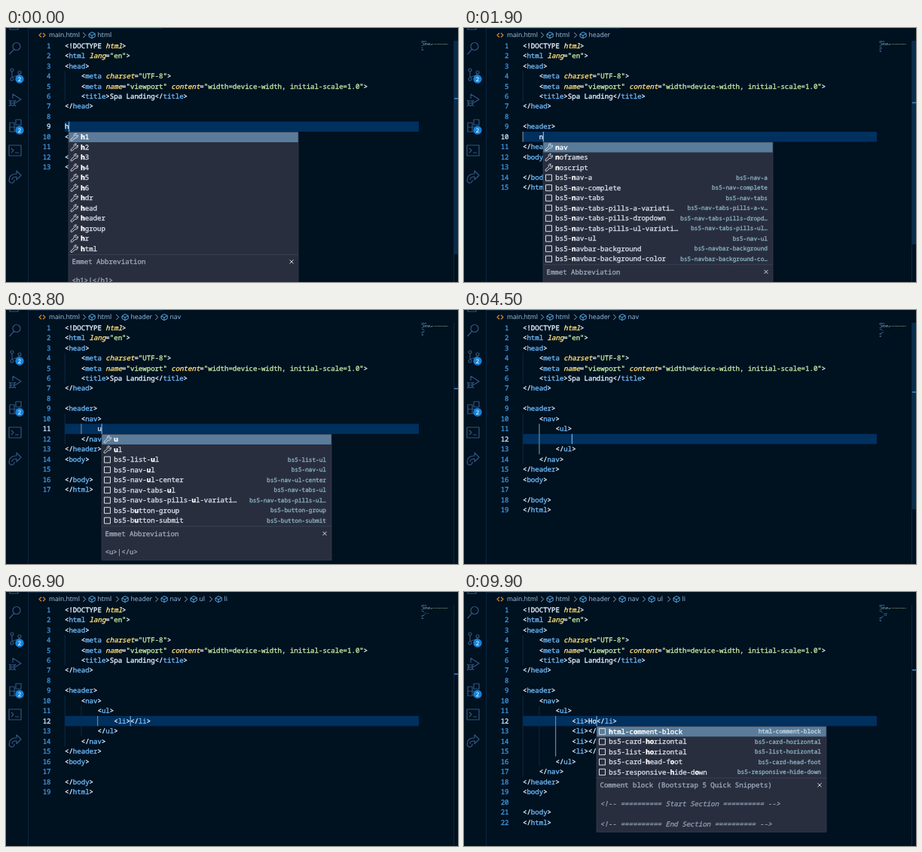
An HTML page with a canvas for the animation above (10000 ms loop, 600x338 px).

```html
<!DOCTYPE html>
<html lang="en">
<head>
<meta charset="UTF-8">
<title>Editor typing loop</title>
<style>
html, body { margin: 0; width: 100%; height: 100%; overflow: hidden; background: #001120; }
canvas { display: block; width: 600px; height: 338px; }
</style>
</head>
<body>
<canvas id="stage" width="600" height="338"></canvas>
<script>
const ctx = document.getElementById('stage').getContext('2d');
const LOOP = 10000, X0 = 78, Y0 = 23.5, CW = 5.435, LH = 13.47, VIEW = 399;
const SLIDER_TIME = 900;
const MONO = '"Noto Sans Mono", "DejaVu Sans Mono", monospace';
const UI = '"Open Sans", "Noto Sans", sans-serif';
const C = {
  bg: '#001120', line: '#00305e', border: '#0b2740', icon: '#30577f', badge: '#1583d8',
  number: '#3e93d6', active: '#c4e2fb', crumb: '#84aac8', cube: '#55a8e6',
  punct: '#e4f1ff', tag: '#6db8f6', attr: '#ffe07a', string: '#c4e8a4',
  guide: '#0d2b45', guideOn: '#8497a8', popup: '#292e3e', chosen: '#5a7c9a',
  label: '#d5dde8', detail: '#86aebf', dim: '#9aa6b8'
};

const HEAD = ['<!DOCTYPE html>', '<html lang="en">', '<head>', '    <meta charset="UTF-8">',
  '    <meta name="viewport" content="width=device-width, initial-scale=1.0">',
  '    <title>Spa Landing</title>', '</head>', ''];
const TAIL = ['<body>', '', '</body>', '</html>'];

const inHeader = (...rows) => ['<header>', ...rows.map(r => '    ' + r), '</header>'];
const inNav = (...rows) => inHeader('<nav>', ...rows.map(r => '    ' + r), '</nav>');
const inList = (...rows) => inNav('<ul>', ...rows.map(r => '    ' + r), '</ul>');
const li = '<li></li>';
const items = n => inList(...Array(n).fill(li));

// time, edited lines, cursor line, cursor column, popup word
const STATES = [
  ...['h', 'he', 'hea', 'head', 'heade', 'header'].map((w, i) =>
    [i && 100 + i * 100, [w], 9, w.length, w]),
  [800, ['<header></header>'], 9, 8],
  [1500, inHeader(''), 10, 4],
  [1900, inHeader('n'), 10, 5, 'n'],
  [2100, inHeader('na'), 10, 6, 'na'],
  [2300, inHeader('nav'), 10, 7, 'nav'],
  [2500, inHeader('<nav></nav>'), 10, 9],
  [2900, inNav(''), 11, 8],
  [3400, inNav('u'), 11, 9, 'u'],
  [3900, inNav('ul'), 11, 10, 'ul'],
  [4100, inNav('<ul></ul>'), 11, 12],
  [4500, inList(''), 12, 12],
  [5000, inList('l'), 12, 13, 'l'],
  [5600, inList('li'), 12, 14, 'li'],
  [5900, items(1), 12, 16],
  [7000, items(2), 13, 16],
  [7300, items(3), 14, 16],
  [7600, items(4), 15, 16],
  [8000, items(4), 14, 16],
  [8200, items(4), 13, 16],
  [8300, items(4), 12, 16],
  [9600, inList('<li>H</li>', li, li, li), 12, 17],
  [9700, inList('<li>H</li>', li, li, li), 12, 17, 'h'],
  [9900, inList('<li>Ho</li>', li, li, li), 12, 18, 'ho']
];
const CRUMBS = [[0, 'html', 114], [1300, 'header', 158], [3400, 'nav', 210], [4900, 'ul', 249], [6500, 'li', 282]];
const BLINK_OFF = [[1300, 1500], [6400, 6900], [8900, 9300]];

const TAGS = 'h1 h2 h3 h4 h5 h6 hdr head header hgroup hr html nav noframes noscript u ul label legend li link'.split(' ');
const bs = names => names.split(' ').map(n => 'bs5-' + n);
const NAVS = bs('nav-a nav-complete nav-tabs nav-tabs-pills-a-variation nav-tabs-pills-dropdown ' +
  'nav-tabs-pills-ul-variation nav-ul navbar-background navbar-background-color');
const ULS = bs('list-ul nav-ul nav-ul-center nav-tabs-ul nav-tabs-pills-ul-variation');
const SNIPPETS = {
  n: NAVS, na: NAVS, nav: NAVS,
  u: [...ULS, ...bs('button-group button-submit')], ul: ULS,
  l: bs('label-form list-group list-inline list-ul link-color link-block lead-text list-group-flush'),
  li: bs('list-group list-inline list-ul link-color link-block list-group-flush'),
  ho: ['html-comment-block', ...bs('card-horizontal list-horizontal card-head-foot responsive-hide-down')]
};

const rowY = n => Y0 + (n - 1) * LH;

function box(x, y, w, h, color) {
  ctx.fillStyle = color;
  ctx.fillRect(x, y, w, h);
}

function glyph(path, x, y, color, width = 1) {
  ctx.save();
  ctx.translate(x, y);
  ctx.strokeStyle = color;
  ctx.lineWidth = width;
  ctx.stroke(new Path2D(path));
  ctx.restore();
}

// Filled text with a hairline outline for a medium weight
function ink(text, x, y, color, weight) {
  ctx.fillStyle = ctx.strokeStyle = color;
  ctx.lineWidth = weight;
  ctx.fillText(text, x, y);
  ctx.strokeText(text, x, y);
}

// Monospaced text on an exact character grid, y is the middle of the capitals
function mono(text, x, y, color, style = '', cell = CW) {
  ctx.font = `${style} ${cell / 0.6}px ${MONO}`;
  [...text].forEach((ch, i) => ch !== ' ' && ink(ch, x + i * cell, y + cell * 0.58, color, 0.35));
}

function ui(text, x, y, color, size = 8.6) {
  ctx.font = `${size}px ${UI}`;
  ink(text, x, y + 3.1, color, 0.15);
}

function code(text, x, y) {
  const token = /("[^"]*")|(<[!\/]?)(\w+)|([\w-]+)(?==")|(=)|( html)(?=>)|(>)|([^<>]+?)(?=<|$)|(\s+)/g;
  for (const m of text.matchAll(token)) {
    const at = x + m.index * CW;
    if (m[2]) {
      mono(m[2], at, y, C.punct);
      mono(m[3], at + m[2].length * CW, y, m[2] === '<!' ? C.punct : C.tag);
    } else if (m[1]) mono(m[1], at, y, C.string);
    else if (m[4] || m[6]) mono(m[0], at, y, C.attr, 'italic');
    else mono(m[0], at, y, C.punct);
  }
}

function activityBar() {
  box(29, 0, 1, 338, C.border);
  const icons = [
    [0, 'M-7 -4V2H4V-4'],
    [27, 'M-1.5 1.5L-7.5 8M-3 -2.5A5 5 0 1 0 7 -2.5A5 5 0 1 0 -3 -2.5'],
    [62, 'M-6 -6A2 2 0 1 0 -2 -6A2 2 0 1 0 -6 -6M-6 6A2 2 0 1 0 -2 6A2 2 0 1 0 -6 6M4 -3A2 2 0 1 0 8 -3A2 2 0 1 0 4 -3M-4 -4V4M6 -1C5 3 -2 1 -4 4'],
    [96, 'M-3 -2V-8L8 -1L0 4M-6 1H-1V6Q-3.5 9 -6 6ZM-8 0L-6 2M1 0L-1 2M-8 4H1M-8 8L-6 6M1 8L-1 6'],
    [130, 'M-7 -4H-1V8H-7ZM-7 2H5V8H-1M1 -8H8V-1H1Z'],
    [163, 'M-8 -7H8V7H-8ZM-5 -3L-2 0L-5 3M0 3H5'],
    [197, 'M-4 5C-4 2 -2 1 2 1V5L8 -1L2 -7V-3C-4 -3 -7.5 0 -7.5 4A3.5 3.5 0 1 0 -1 5']
  ];
  for (const [y, path] of icons) glyph(path, 12, y, C.icon, 1.2);
  for (const y of [68, 136]) {
    ctx.fillStyle = C.badge;
    ctx.beginPath();
    ctx.arc(18, y, 5.7, 0, 7);
    ctx.fill();
    ui('2', 15.8, y, '#fff', 7.6);
  }
}

function breadcrumbs(t) {
  box(30, 0, 178, 1, C.border);
  glyph('M-1 -2.7L-4 0L-1 2.7M1 -2.7L4 0L1 2.7', 48, 9.5, '#d08a3c', 1.2);
  ui('main.html', 57, 9, C.crumb);
  for (const [start, name, x] of CRUMBS) {
    if (t < start) break;
    glyph('M-1.7 -3.5L1.7 0L-1.7 3.5', x - 10, 9.5, C.crumb);
    glyph('M-4 -1.5L0 -4L4.2 -2V2L0 4.2L-4 2ZM-4 -1.5L0 .5L4.2 -2M0 .5V4', x, 9.5, C.cube);
    ui(name, x + 7.6, 9, C.crumb);
  }
}

function guides(lines, cursor) {
  const depth = [];
  lines.forEach((text, i) => depth.push(text.trim() ? text.search(/\S/) : depth[i - 1] || 0));
  const bar = (i, col, color) => box(X0 + col * CW - 0.3, rowY(i + 1) - LH / 2, 1, LH, color);
  depth.forEach((d, i) => { for (let col = 0; col < d; col += 4) bar(i, col, C.guide); });
  const on = depth[cursor - 1] - 4;
  if (on < 0) return;
  let i = cursor - 1;
  while (depth[i - 1] > on) i--;
  for (; depth[i] > on; i++) bar(i, on, C.guideOn);
}

function minimap(lines) {
  ctx.globalAlpha = 0.5;
  lines.forEach((text, row) => {
    for (const m of text.matchAll(/[^\s<>="]+/g)) {
      box(551 + m.index * 0.5, 17 + row, m[0].length * 0.5, 0.75, row > 2 && row < 5 ? C.string : C.tag);
    }
  });
  ctx.globalAlpha = 1;
}

// The slider shows for a while after the number of lines changes
function scrollbar(t, state) {
  const count = s => HEAD.length + s[1].length + TAIL.length;
  const changed = STATES.find(s => count(s) === count(state))[0];
  const ratio = VIEW / (VIEW + (count(state) - 1) * LH);
  box(594, 17, 1, 321, C.border);
  if (t < changed + SLIDER_TIME) box(595, 17, 5, VIEW * ratio, '#082c4c');
  box(595, 16.3 + (state[2] - 1) * LH * ratio, 5, 1.6, '#3f83b9');
}

function suggestion(name, word, x, y, chosen) {
  const snippet = name.includes('-');
  const icon = snippet ? 'M-4 -4H4V4H-4Z'
    : 'M-4.5 3L0 -1.3C-1 -4 1 -5.3 3 -4.6L1.4 -2.6L2.8 -1.2L4.8 -2.8C5.3 0 3.5 1.7 1.4 1L-3 4.8Q-4.8 5 -4.5 3Z';
  glyph(icon, x + 7.5, y, C.label);
  const label = name.length >= 30 ? name.slice(0, -2) + '…' : name;
  let hit = 0;
  [...label].forEach((ch, i) => {
    const match = ch === word[hit];
    if (match) hit++;
    mono(ch, x + 16.3 + i * CW, y, match || chosen ? '#fff' : C.label, match ? 'bold' : '');
  });
  if (!snippet) return;
  const cell = 4.63, room = Math.floor((266 - label.length * CW) / cell);
  const detail = name.length > room ? name.slice(0, room - 1) + '…' : name;
  mono(detail, x + 298 - detail.length * cell, y, chosen ? '#c3d6e4' : C.detail, '', cell);
}

function popup(word, x, line) {
  const names = [...TAGS.filter(n => n.startsWith(word)), ...(SNIPPETS[word] || [])].slice(0, 12);
  const top = rowY(line) + LH / 2 + 0.5, pitch = 13.5;
  const split = top + names.length * pitch + 1;
  const comment = word === 'ho';
  const height = split - top + (comment ? 72 : 45);
  box(x, top, 305, height, C.popup);
  box(x, top, 305, pitch, C.chosen);
  names.forEach((name, i) => suggestion(name, word, x, top + (i + 0.5) * pitch, !i));
  box(x, split - 0.5, 305, 0.8, '#3c4558');
  const title = split + 9.5;
  mono(comment ? 'Comment block (Bootstrap 5 Quick Snippets)' : 'Emmet Abbreviation', x + 4.5, title, C.dim);
  glyph('M-2.5 -2.5L2.5 2.5M2.5 -2.5L-2.5 2.5', x + 296, title, C.label);
  if (comment) {
    ['Start', 'End'].forEach((s, i) =>
      mono(`<!-- ========== ${s} Section ========== -->`, x + 4.5, title + 24.5 + i * 27, '#8c9aae', 'italic'));
  } else mono(`<${names[0]}>|</${names[0]}>`, x + 4.5, title + 24.5, C.dim);
  ctx.strokeStyle = '#3a4152';
  ctx.lineWidth = 0.7;
  ctx.strokeRect(x, top, 305, height);
}

function draw(t) {
  const state = STATES.findLast(s => s[0] <= t);
  const [, edited, cursor, col, word] = state;
  const lines = [...HEAD, ...edited, ...TAIL];
  box(0, 0, 600, 338, C.bg);
  activityBar();
  breadcrumbs(t);
  box(X0, rowY(cursor) - LH / 2, 470, LH, C.line);
  guides(lines, cursor);
  lines.forEach((text, i) => {
    const n = String(i + 1), y = rowY(i + 1);
    mono(n, 59.5 - n.length * CW, y, i + 1 === cursor ? C.active : C.number);
    code(text, X0, y);
  });
  minimap(lines);
  scrollbar(t, state);
  const caret = X0 + col * CW;
  if (!BLINK_OFF.some(([a, b]) => t >= a && t < b)) box(caret - 0.4, rowY(cursor) - LH / 2, 1.2, LH, '#6fb0e2');
  if (word) popup(word, Math.round(caret), cursor);
}

ctx.textRendering = 'geometricPrecision';
ctx.lineJoin = 'round';
const start = performance.now();
function tick() {
  draw((performance.now() - start) % LOOP);
  requestAnimationFrame(tick);
}
tick();
</script>
</body>
</html>
```
